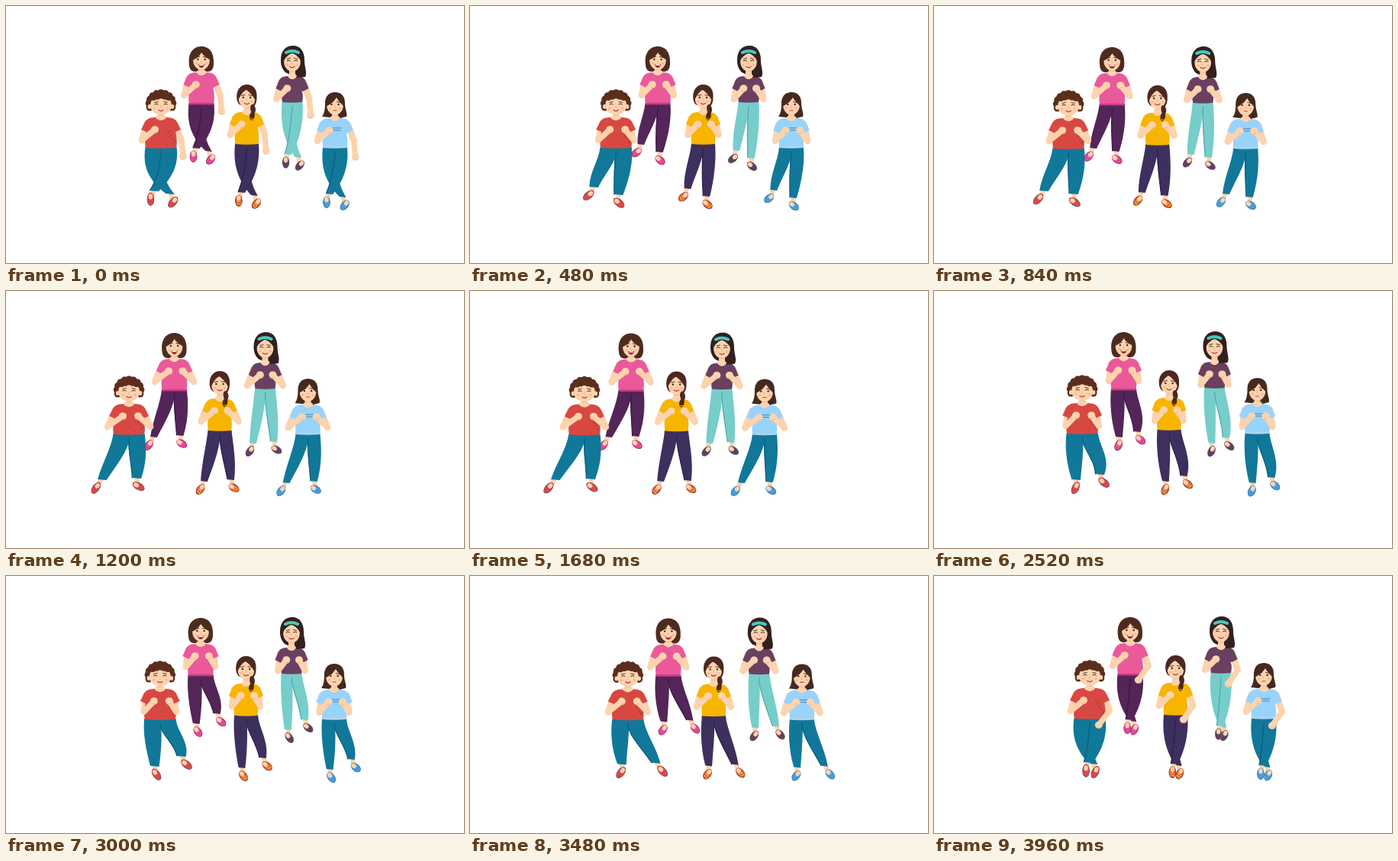
Write an HTML page with a canvas that moves like this. It is 600 px wide and 337 px high and loops after 4 s.

```html
<!DOCTYPE html>
<html lang="en">
<head>
<meta charset="utf-8">
<title>Dance class</title>
<style>
  html, body { margin: 0; width: 100%; height: 100%; overflow: hidden; background: #fff; }
  canvas { display: block; width: 600px; height: 337px; }
</style>
</head>
<body>
<canvas id="stage" width="600" height="337"></canvas>
<script>
const ctx = document.getElementById('stage').getContext('2d');
const LOOP = 4000, STEP = 120;
const SKIN = '#fcd3ae', SHADE = '#e9b48f', INK = '#3b2420', LIP = '#cf3f45';

// time, body x, body y, left arm, right arm, elbow reach (arm: 0 guard, 1 at hip, 2 lowered)
const BODY = [
  [0, 0, 0, 0, 2, 25],
  [480, -10, 0, 0, 0, 23],
  [1200, -35.5, 2, 0, 0, 28],
  [1680, -45, 2.5, 0, 0, 28],
  [1800, -42, 2, .6, 0, 26],
  [1920, -37, 1.5, 1.2, 0, 25],
  [2040, -31, 1, 2, 0, 25],
  [2520, -7.5, 1, 0, 0, 21.5],
  [3000, -1, 2, 0, 0, 21],
  [3600, 5, 2.5, 0, 0, 27],
  [3960, 1, 1, 0, 1.1, 25]
];

// time, then x, y, toe angle and knee offset of the left and right foot
const LEGS = [
  [0, 13, 2, 130, -9, -11, -2, 90, 6],
  [480, -29, -7, 140, -2, 3, 3, 40, 1],
  [1200, -35, 3, 125, 0, 10, 1, 30, 2],
  [1680, -38, 3, 130, 0, 8, 2, 35, 2],
  [1800, -16, -3, 105, -2, -2, 2, 60, 2],
  [1920, 4, 0, 90, -4, -5, 2, 65, 6],
  [2040, 11, -2, 90, -6, -13, 2, 50, 9],
  [2520, -7, 3, 115, -1, 23, -4, 40, 6],
  [3000, -4, 5, 55, 0, 28, -8, 40, 5],
  [3600, -8, 2, 145, -2, 39, 3, 50, 0],
  [3960, 6, 2, 115, -6, -4, 0, 90, 4]
];

// m: shoulder scale, w: waist half width, h: shirt length, sp: step width, sh: step shift
const DANCERS = [
  { kind: 'bob', x: 256, y: 87, m: .91, w: 16, h: 41, foot: 199, sp: .95, sh: 0, head: -16,
    top: '#ea5a9b', pants: '#532559', fold: '#3c1742', shoe: '#ec4595', hair: '#4d2c20' },
  { kind: 'long', x: 375, y: 92, m: .83, w: 13, h: 34, foot: 207, sp: .77, sh: 9, head: -19,
    top: '#694060', pants: '#76cdca', fold: '#4fa9a8', shoe: '#6a3c5e', hair: '#33201f' },
  { kind: 'curly', x: 203, y: 146, m: 1, w: 20, h: 40, foot: 255, sp: 1.23, sh: 0, head: -16, travel: 1.18,
    top: '#d84842', pants: '#11789a', fold: '#0b5c7c', shoe: '#dc4747', hair: '#5b2e1d' },
  { kind: 'braid', x: 315.5, y: 139, m: .87, w: 15, h: 42, foot: 257, sp: .97, sh: 11, head: -18,
    top: '#f7b500', pants: '#3d305f', fold: '#29204a', shoe: '#e2572c', hair: '#4d2820' },
  { kind: 'flip', x: 431, y: 147, m: .92, w: 15.5, h: 39, foot: 259, sp: 1, sh: 0, head: -17,
    top: '#98d3fb', pants: '#11789a', fold: '#0b5c7c', shoe: '#4a9bdc', hair: '#45291f' }
];

const HAIR = {
  bob: 'M-16 6C-18-10-10-18 0-18C11-18 17-9 16 5C16 11 13 15 9 15L-9 15C-13 15-16 11-16 6Z',
  long: 'M-15-2C-15-15-8-21 1-21C11-21 16-13 16-2C16 8 20 14 17 20L6 21L-9 14C-14 9-15 3-15-2Z',
  braid: 'M-13 2C-15-11-8-18 0-18C9-18 14-11 13-1C13 6 11 9 8 12L-8 9C-11 8-12 5-13 2Z',
  flip: 'M-13-4C-12-14-6-17 0-17C8-17 13-12 13-3C13 6 17 12 15 15L7 17L-8 16L-17 15C-13 10-13 2-13-4Z'
};
const FRINGE = {
  bob: 'M-12 0C-13-11-5-16 2-15C10-14 12-7 12 0C6-3 2-7 0-10C-2-6-6-2-12 0Z',
  long: 'M-12 0C-13-12-6-17 0-17C8-17 13-11 12 0C9-5 6-9 0-11C-6-9-9-5-12 0Z',
  braid: 'M-11 2C-13-10-6-16 0-16C8-16 13-9 12 4C9-1 5-8-1-11C-6-8-8-4-11 2Z',
  flip: 'M-12 2C-13-10-6-16 1-16C9-16 13-9 12 2C8-2 4-6 2-10C-1-5-6-1-12 2Z'
};

const mix = (a, b, k) => a + (b - a) * k;

function sample(keys, t) {
  let i = keys.length - 1;
  while (keys[i][0] > t) i--;
  const a = keys[i], b = keys[i + 1] || a;
  const k = b === a ? 0 : (t - a[0]) / (b[0] - a[0]);
  return a.map((v, j) => mix(v, b[j], k)).slice(1);
}

function ell(x, y, rx, ry, color, turn = 0) {
  ctx.fillStyle = color;
  ctx.beginPath();
  ctx.ellipse(x, y, rx, ry, turn, 0, Math.PI * 2);
  ctx.fill();
}

function line(color, width, ...p) {
  ctx.strokeStyle = color;
  ctx.lineWidth = width;
  ctx.beginPath();
  ctx.moveTo(p[0], p[1]);
  for (let i = 2; i < p.length; i += 2) ctx.lineTo(p[i], p[i + 1]);
  ctx.stroke();
}

function shape(d, color) {
  ctx.fillStyle = color;
  ctx.fill(new Path2D(d));
}

function curve(d, color, width) {
  ctx.strokeStyle = color;
  ctx.lineWidth = width;
  ctx.stroke(new Path2D(d));
}

function foot(d, x, y, deg) {
  const long = d.kind === 'curly' ? 8.5 : 7.5;
  ctx.save();
  ctx.translate(x, y);
  ctx.rotate(deg * Math.PI / 180);
  ell(.4, 0, long, 4.8, d.fold);
  ell(0, 0, long, 4.4, d.shoe);
  ell(-3.2, 0, 3.6, 2.7, SKIN);
  if (d.kind === 'braid') for (const i of [2, 5]) line('#f7c02a', 1.2, i, -2.5, i - 1, 2.5);
  ctx.restore();
}

function leg(d, side, x, y, deg, bend) {
  const hipX = side * d.w * .5, thigh = d.w * .53;
  const ax = x - Math.cos(deg * Math.PI / 180) * 2 + (hipX - x) * .2;
  const ay = y - 11, aw = d.kind === 'curly' ? 5.8 : 4.4;
  const kx = mix(hipX, ax, .56) + bend * 1.3 * d.w / 16;
  const ky = mix(d.h, ay, .62), kw = d.w * .4 + 2.5;
  line(SKIN, 6, ax, ay - 2, mix(ax, x, .6), y - 4);
  foot(d, x, y, deg);
  ctx.fillStyle = d.pants;
  ctx.beginPath();
  ctx.moveTo(hipX - thigh, d.h - 1);
  ctx.bezierCurveTo(hipX - thigh * 1.2, d.h + 17, kx - kw, ky, ax - aw, ay);
  ctx.lineTo(ax + aw, ay + 1);
  ctx.bezierCurveTo(kx + kw, ky, hipX + thigh * 1.2, d.h + 17, hipX + thigh, d.h - 1);
  ctx.fill();
  if (side > 0) {
    ctx.strokeStyle = d.fold;
    ctx.lineWidth = 1.2;
    ctx.beginPath();
    ctx.moveTo(hipX - thigh * .9, d.h + 5);
    ctx.bezierCurveTo(hipX - thigh * 1.1, d.h + 17, kx - kw, ky, ax - aw, ay);
    ctx.stroke();
  }
}

function armPoints(d, side, low, reach) {
  const up = [side * 10 + 2, 16], hip = [side * 10, 48], down = [side * 29, 51];
  const [a, b, k] = low < 1 ? [up, hip, low] : [hip, down, low - 1];
  return {
    sx: side * 18 * d.m, sy: 8,
    ex: side * (reach + low) * d.m, ey: 30,
    fx: mix(a[0], b[0], k) * d.m, fy: mix(a[1], b[1], k)
  };
}

function forearm(p) {
  line(SKIN, 7.5, p.ex, p.ey, p.fx, p.fy);
  ell(p.fx, p.fy, 5, 4.8, SKIN);
  line(SHADE, .8, p.fx - 2, p.fy + 4, p.fx + 2.5, p.fy + 3);
}

function shirt(d) {
  const { m, w, h } = d, side = w * .96;
  ctx.fillStyle = d.top;
  ctx.beginPath();
  ctx.moveTo(-8 * m, 0);
  ctx.quadraticCurveTo(-18 * m, 0, -21 * m, 6);
  ctx.lineTo(-26 * m, 16);
  ctx.lineTo(-17 * m, 20);
  ctx.lineTo(-side, 19);
  ctx.quadraticCurveTo(-w - 2, h - 8, -w, h);
  ctx.quadraticCurveTo(0, h + 1.5, w, h);
  ctx.quadraticCurveTo(w + 2, h - 8, side, 19);
  ctx.lineTo(17 * m, 20);
  ctx.lineTo(26 * m, 16);
  ctx.lineTo(21 * m, 6);
  ctx.quadraticCurveTo(18 * m, 0, 8 * m, 0);
  ctx.fill();
  if (d.kind === 'flip') {
    line('#3f83b8', 1, -6, 13, 8, 13);
    line('#3f83b8', 1, -5, 16, 7, 16);
    line('#c4d3dc', 1.5, -w + 1, h - 1, w - 1, h - 1);
  } else if (d.kind === 'bob') {
    for (let x = -w + 2; x < w; x += 4) ell(x, h, 2.2, 1.6, '#cf3d82');
  } else if (d.kind === 'curly') {
    for (let i = 0; i < 9; i++) ell(7 + (i * 5) % 12, 17 + (i * 8) % 21, .8, .8, '#9d2f35');
  }
}

function face(d) {
  const wide = d.kind === 'curly' ? 14 : 10.8;
  ell(0, 0, wide, 12.8, SKIN);
  const eye = wide * .43;
  for (const s of [-1, 1]) {
    const x = s * eye;
    line(INK, .9, x - 2.2, -4.5 + (s < 0), x + 2.2, -4.5 + (s > 0));
    ell(s * wide * .6, 4, 2, 1.5, '#f7b79d');
    if (d.kind === 'curly' || d.kind === 'long') curve(`M${x - 2.2} -1q2.2 -2 4.4 0`, INK, 1);
    else ell(x, -1, 1.2, 1.2, INK);
  }
  line(SHADE, .9, 0, 0, -.8, 3, .8, 3);
  if (d.kind === 'bob') {
    shape('M-4.5 5Q0 7 4.5 5Q3 10 0 10Q-3 10-4.5 5Z', '#a62632');
    line('#fff', 1.2, -2.8, 6.5, 2.8, 6.5);
  } else if (d.kind === 'flip') {
    line(LIP, 1.2, -2.2, 7, 2.2, 7);
  } else {
    curve('M-3 6.5Q0 9 3 6.5', LIP, 1.5);
  }
}

function curls(color) {
  ell(0, -7, 15, 10, color);
  for (let i = 0; i < 11; i++) {
    const a = (160 + i * 22) * Math.PI / 180;
    ell(Math.cos(a) * 15.5, Math.sin(a) * 14 - 2, 4.8, 4.8, color);
  }
}

function head(d) {
  ctx.save();
  ctx.translate(0, d.head);
  if (d.kind === 'curly') curls(d.hair);
  else shape(HAIR[d.kind], d.hair);
  const n = -d.head;
  line(SKIN, 8, 0, 9, 0, n);
  ell(0, n, 7 * d.m, 3.4, SKIN);
  line(SHADE, 1, -3, 13, 3, 13);
  face(d);
  if (d.kind === 'curly') {
    for (let i = -2; i < 3; i++) ell(i * 5, -12 + Math.abs(i) * 1.2, 4, 3.5, d.hair);
    for (const s of [-1, 1]) ell(s * 15, 2, 2.2, 3, SKIN);
  } else {
    shape(FRINGE[d.kind], d.hair);
  }
  if (d.kind === 'long') curve('M-8-12Q0-16 8-12', '#49c8bd', 4);
  if (d.kind === 'braid') {
    ell(8, 14, 3.4, 6, d.hair, -.15);
    ell(7, 23, 3.2, 6, d.hair, .2);
    line(d.top, 1, 5, 27, 8, 27);
  }
  ctx.restore();
}

function dancer(d, body, legs) {
  const [bx, by, lowL, lowR, reach] = body;
  const [lx, ly, la, lk, rx, ry, ra, rk] = legs;
  const dx = bx < 0 ? bx * (d.travel || 1) : bx;
  const shift = -bx / 45 * d.sh;
  const ground = d.foot - d.y - by;
  ctx.save();
  ctx.translate(d.x + dx, d.y + by);
  leg(d, -1, lx * d.sp + shift, ground + ly, la, lk);
  leg(d, 1, rx * d.sp + shift, ground + ry, ra, rk);
  const arms = [armPoints(d, -1, lowL, reach), armPoints(d, 1, lowR, reach)];
  for (const p of arms) line(SKIN, 8.5, p.sx, p.sy, p.ex, p.ey);
  shirt(d);
  arms.forEach(forearm);
  head(d);
  ctx.restore();
}

function draw(now) {
  const t = Math.floor((now % LOOP) / STEP) * STEP;
  const body = sample(BODY, t), legs = sample(LEGS, t);
  ctx.fillStyle = '#fff';
  ctx.fillRect(0, 0, 600, 337);
  for (const d of DANCERS) dancer(d, body, legs);
}

ctx.lineCap = ctx.lineJoin = 'round';
let start;
function tick(now) {
  start ??= now;
  draw(Math.max(0, now - start));
  requestAnimationFrame(tick);
}
draw(0);
requestAnimationFrame(tick);
</script>
</body>
</html>
```
